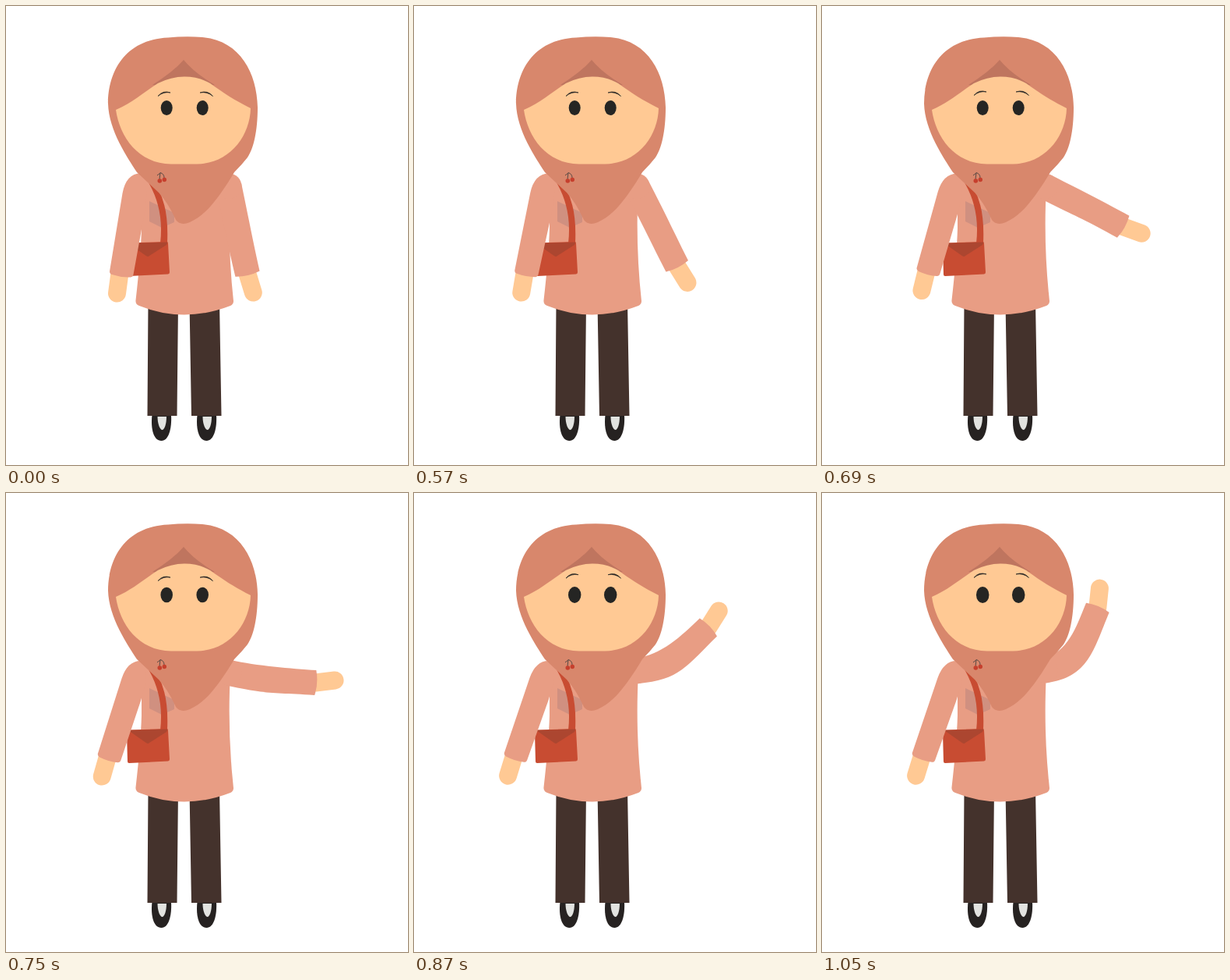
These frames come from a looping animation (516 by 588 pixels, 3600 ms). An HTML page:

```html
<!DOCTYPE html>
<html lang="en">
<head>
<meta charset="utf-8">
<title>Waving hello</title>
<style>
  html, body { margin: 0; width: 100%; height: 100%; overflow: hidden; background: #fff; }
  svg { display: block; width: 100%; height: 100%; }
  .shirt { fill: #e89d84; }
  .scarf { fill: #d8876c; }
  .skin { fill: #ffc994; }
  .hand { fill: none; stroke: #ffc994; stroke-width: 23; stroke-linecap: round; }
  .pants { fill: #44322c; }
  .ink { fill: #252523; }
  .brow { fill: #252523; stroke: #252523; stroke-width: .7; stroke-linejoin: round; }
  .bag { fill: #c84c32; }
</style>
</head>
<body>
<svg viewBox="0 0 516 588">
  <defs>
    <g id="shoe">
      <path fill="#262221" d="M-12 524H12.500C13.500 542 9 557 0 557C-10 557 -14 542 -12 524Z"/>
      <path fill="#e2e3e0" d="M-5 526H6.500C6.500 535 4 543 1 543C-2 543 -5 535 -5 526Z"/>
    </g>
  </defs>

  <use href="#shoe" x="199.500"/>
  <use href="#shoe" x="257.500"/>
  <path class="pants" d="M182.500 380H221L219.500 525H181.500Z M235.500 380H274L276.500 525H238Z"/>

  <path class="shirt" d="M174 212V285Q173 320 166.500 377Q166 382 171 384Q228 407 288 384Q292 382 292 378Q284.500 310 287.500 240L291 212Z"/>
  <path fill="#d09080" d="M184 250L216 265V277L200 284L184 276Z"/>
  <path class="bag" d="M182 224L196 236Q209 260 207 304H198Q203 262 184 228Z"/>
  <path class="bag" d="M155 306Q155 304 157 303.500L206 302Q208 302 208 304L210 341Q210 343 208 343.500L158 346Q156 346 156 344Z"/>
  <path fill="#ac4630" d="M157 304L207.500 302.500L206 306L184 320Q182 322 179 319.500Z"/>

  <g id="restArm">
    <path class="hand" d="M146 342L142.500 368"/>
    <path class="shirt" d="M173 214Q154 215 149.500 240L133 340Q133 343 136 344Q148 348 160 347.500Q163 347 163.500 344L178 264L181 238Z"/>
  </g>

  <path class="hand" id="waveHand"/>
  <path class="shirt" id="waveSleeve"/>
  <circle class="shirt" id="shoulder" cx="286" r="16.500"/>

  <path class="scarf" d="M131 125C131 85 152 43 208 40.500Q230 38.500 252 40C300 44 322 85 323 130C323 160 318 182 310 194Q303 203 293 213C272 248 256 268 236 277Q224 282 218 274Q208 252 196 239L168 213C156 194 132 160 131 125Z"/>
  <path fill="#bf755f" d="M228 69Q215 84 188 101L228 106L268 101Q242 86 228 69Z"/>
  <path class="skin" d="M141 133C162 124 175 112 195 99Q212 90.500 229 90.500Q247 90.500 262 99C280 112 294 121 314 131C313 168 286 202 245 202.500H212C170 202 146 168 141 133Z"/>

  <ellipse class="ink eye" cx="206.200" cy="130.500"/>
  <ellipse class="ink eye" cx="252.200" cy="130.500"/>
  <g id="brows">
    <path class="brow" d="M195 115.500Q201.500 107.500 211 111Q202 109.500 195 115.500Z"/>
    <path class="brow" d="M249 111Q259 107.500 265.500 115.500Q258.500 109.500 249 111Z"/>
  </g>

  <path fill="none" stroke="#5a4a44" d="M197 222L198 213.500Q203 215 203 220M194 217L198 214"/>
  <circle cx="197.300" cy="224" r="2.800" fill="#c63f2d"/>
  <circle cx="203.300" cy="222.500" r="2.700" fill="#c63f2d"/>
</svg>

<script>
const LOOP = 3600, START = 450, GAP = 120, STEP = 30;

// Pose values spaced GAP ms apart; angles in degrees, clockwise from right.
const poses = {
  reach:    [78, 62.7, 25.6, -16.3, -46.8, -52.8],
  upper:    [78, 62, 27, 2, -8, -8],
  cuff:     [77, 63, 29, -22, -59, -67.5],
  hand:     [73, 58, 20, -34, -74, -84],
  shoulder: [231, 231, 231, 229, 227, 227],
  rest:     [0, 2, 6.2, 9.4, 9.4, 9.4],
  brows:    [0, 0, -1, -5, -7, -7],
  eyes:     [1, 1, 1, 1.08, 1.1, 1.1]
};

const el = id => document.getElementById(id);
const eyes = document.querySelectorAll('.eye');
const polar = ([x, y], deg, r) => {
  const a = deg * Math.PI / 180;
  return [x + r * Math.cos(a), y + r * Math.sin(a)];
};
const pt = p => p.map(v => v.toFixed(2)).join(' ');

// Smooth curve through the values that never overshoots them.
function sample(keys, u) {
  const last = keys.length - 1;
  if (u <= 0) return keys[0];
  if (u >= last) return keys[last];
  const slope = i => {
    if (i === 0 || i === last) return 0;
    const a = keys[i] - keys[i - 1], b = keys[i + 1] - keys[i];
    return a * b <= 0 ? 0 : 2 * a * b / (a + b);
  };
  const i = Math.floor(u), f = u - i, g = 1 - f;
  return keys[i] * (1 + 2 * f) * g * g + slope(i) * f * g * g
       + keys[i + 1] * f * f * (3 - 2 * f) - slope(i + 1) * f * f * g;
}

function draw(ms) {
  const u = (Math.floor(ms / STEP) * STEP - START) / GAP;
  const p = {};
  for (const name in poses) p[name] = sample(poses[name], u);

  const root = [286, p.shoulder];
  const wrist = polar([287, 235], p.reach, 110.5);
  // The outside of the bend gets longer handles than the inside.
  const edge = (side, handle) => {
    const a = polar(root, p.upper + side, 16.5);
    const b = polar(wrist, p.cuff + side, 16);
    return [a, polar(a, p.upper, handle), polar(b, p.cuff, -handle), b].map(pt);
  };
  const top = edge(-90, 32), low = edge(90, 54);
  const bulge = pt(polar(wrist, p.cuff, 4));

  el('waveSleeve').setAttribute('d',
    `M${top[0]}C${top[1]} ${top[2]} ${top[3]}Q${bulge} ${low[3]}C${low[2]} ${low[1]} ${low[0]}Z`);
  el('waveHand').setAttribute('d', `M${pt(wrist)}L${pt(polar(wrist, p.hand, 25))}`);
  el('shoulder').setAttribute('cy', p.shoulder);
  el('restArm').setAttribute('transform', `rotate(${p.rest} 167 232)`);
  el('brows').setAttribute('transform', `translate(0 ${p.brows})`);
  for (const eye of eyes) {
    eye.setAttribute('rx', 7.5 * p.eyes);
    eye.setAttribute('ry', 9.5 * p.eyes);
  }
}

const begin = performance.now();
function tick() {
  draw((performance.now() - begin) % LOOP);
  requestAnimationFrame(tick);
}
tick();
</script>
</body>
</html>
```
